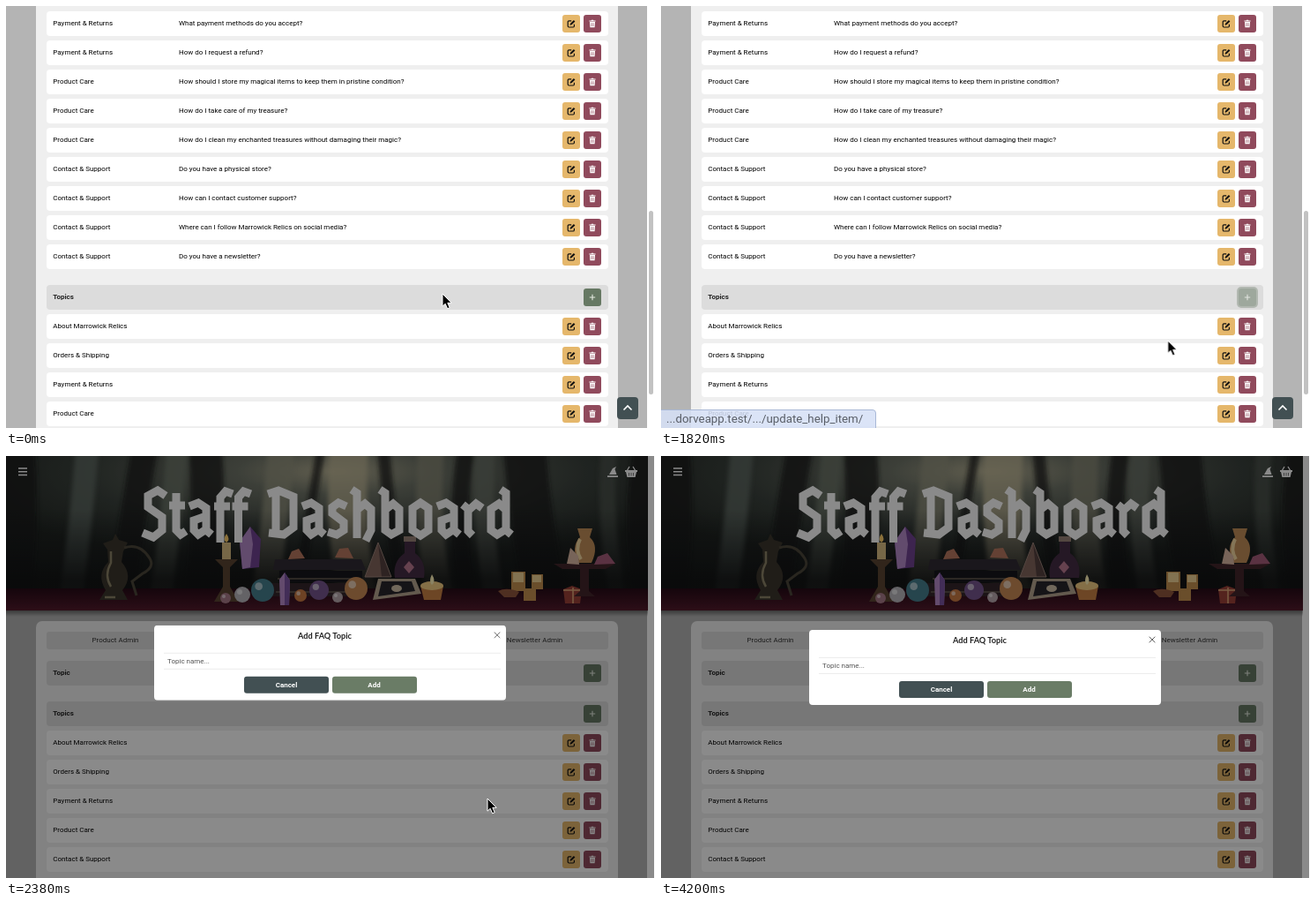
Recreate the animation shown at these times as an HTML page. Size 736 by 478 pixels, loop 4410 ms.

```html
<!DOCTYPE html>
<html lang="en">
<head>
<meta charset="utf-8">
<title>Staff Dashboard</title>
<style>
  html, body { margin: 0; width: 100%; height: 100%; overflow: hidden; background: #fff; }
  #stage { position: relative; width: 736px; height: 478px; overflow: hidden; background: #fff;
    font: 8px/28px Roboto, Arial, sans-serif; color: #000; --loop: 4410ms; }
  #stage * { box-sizing: border-box; }
  .page, .panel, .bar, .btn, .tab, .modal *, .modal, .veil, .status, .thumb, .up, svg { position: absolute; }
  .page { inset: 0; background: linear-gradient(90deg, #b4b4b4 727px, #fff 727px); }
  .panel { left: 34px; width: 660px; background: #efefef; }
  .bar { left: 46px; width: 637px; height: 28px; border-radius: 4px; background: #fff; }
  .bar.head { background: #dcdcdc; font-weight: 700; color: #222; }
  .bar span { position: absolute; left: 7.3px; white-space: nowrap; }
  .bar span + span { left: var(--col, 150px); }
  .btn { top: 4px; width: 20px; height: 20px; border-radius: 3px; }
  .btn svg { left: 5px; top: 4.5px; width: 10px; height: 10px; }
  .edit { left: 585px; background: #e5b76b; }
  .bin { left: 609px; background: #904a5c; color: #fff; }
  .add { left: 609px; background: #667863; color: #fff; }
  .tab { top: 199px; height: 20px; line-height: 20px; border-radius: 3px; background: #dcdcdc; color: #333; text-align: center; }
  .tab.on { background: #525452; color: #fff; font-weight: 700; }
  .thumb { left: 729px; top: 232px; width: 5px; height: 208px; border-radius: 3px; background: #c2c2c2; }
  .up { left: 693px; top: 443px; width: 24px; height: 25px; border-radius: 4px; background: #425053; }
  .status { left: -1px; top: 457px; width: 245px; height: 22px; padding-left: 6px; line-height: 20px; font-size: 13.3px;
    color: #5a5f68; background: rgba(214, 225, 246, .88); border: 1px solid #a9b8d6; border-radius: 0 4px 0 0; white-space: nowrap; }
  .veil { left: 0; top: 0; width: 735px; height: 478px; background: #000; }
  .modal { left: 168px; top: 196.5px; width: 399px; height: 85.5px; border-radius: 4px; background: #fff; }
  .modal h1 { margin: 0; left: 0; width: 387px; top: 2.5px; text-align: center;
    font: 700 9.2px/20px Lato, "Open Sans", sans-serif; color: #222; }
  .field { left: 11px; top: 31.5px; width: 382px; height: 19px; padding-left: 4px; line-height: 17px; color: #555;
    border: solid #ececec; border-width: 1px 0; }
  .act { top: 58.5px; width: 96px; height: 19px; line-height: 19px; border-radius: 3px; text-align: center; font-weight: 700; color: #fff; }

  #list { animation: leave var(--loop) step-end infinite; }
  .late { animation: late var(--loop) step-end infinite; }
  .hover { animation: hover var(--loop) linear infinite; }
  .status { animation: status var(--loop) linear infinite; }
  .veil { animation: veil var(--loop) linear infinite; }
  .modal { animation: fade var(--loop) linear infinite, drop var(--loop) linear infinite; }
  #cursor { left: 0; top: 0; animation: point var(--loop) ease-in-out infinite; }

  @keyframes leave { 0% { visibility: visible } 42.8%, 100% { visibility: hidden } }
  @keyframes late { 0% { visibility: hidden } 47.6%, 100% { visibility: visible } }
  @keyframes hover {
    0%, 16% { opacity: 1; box-shadow: 0 0 0 0 #66786300 }
    19.4%, 30.1% { opacity: .52; box-shadow: 0 0 0 0 #66786300 }
    31.7%, 100% { opacity: .52; box-shadow: 0 0 0 2px #667863b0 }
  }
  @keyframes status { 0%, 18% { opacity: 0 } 21%, 100% { opacity: 1 } }
  @keyframes veil { 0%, 49% { opacity: 0 } 52.4%, 100% { opacity: .46 } }
  @keyframes fade { 0%, 49% { opacity: 0 } 52.4%, 100% { opacity: 1 } }
  @keyframes drop {
    0% { transform: translateY(-50px) }
    49% { transform: translateY(-50px); animation-timing-function: ease-out }
    55.8%, 100% { transform: none }
  }
  @keyframes point {
    0% { transform: translate(495px, 326px); animation-timing-function: cubic-bezier(.45, 0, .72, .8) }
    14.3% { transform: translate(645px, 330px); animation-timing-function: ease-out }
    20%, 33.5% { transform: translate(664.5px, 328px) }
    45.4%, 46% { transform: translate(545px, 396px) }
    54%, 65.1% { transform: translate(546px, 388px) }
    73%, 100% { transform: translate(546px, 482px) }
  }
</style>
</head>
<body>
<div id="stage">
  <svg width="0" height="0">
    <symbol id="edit" viewBox="0 0 10 10">
      <path d="M5.2 1.8H2.4A1.2 1.2 0 0 0 1.2 3V7.8A1.2 1.2 0 0 0 2.4 9H7.2A1.2 1.2 0 0 0 8.4 7.8V5.8" fill="none" stroke="#111" stroke-width="1.2"/>
      <path d="M3.5 6.7L3.9 4.9 7.9 .9 9.4 2.4 5.4 6.3Z" fill="#111"/>
    </symbol>
    <symbol id="bin" viewBox="0 0 10 10">
      <path d="M1.4 1.5H3.6L4 .8H6L6.4 1.5H8.6V2.5H1.4ZM2 3H8L7.6 9.2H2.4Z" fill="currentColor"/>
      <path d="M3.8 4.2V8M5 4.2V8M6.2 4.2V8" stroke="#904a5c" stroke-width=".5"/>
    </symbol>
    <symbol id="add" viewBox="0 0 10 10"><path d="M5 1.8V8.2M1.8 5H8.2" stroke="#e6ebe2" stroke-width="1.1"/></symbol>
  </svg>

  <div class="page" id="dash">
    <svg width="728" height="190" viewBox="0 0 728 190" id="banner">
      <defs>
        <radialGradient id="glow" cx="51%" cy="10%" r="60%">
          <stop offset="0" stop-color="#b3ae92"/><stop offset=".25" stop-color="#6f7468"/>
          <stop offset=".65" stop-color="#3b423d"/><stop offset="1" stop-color="#232824"/>
        </radialGradient>
        <linearGradient id="dusk" x2="0" y2="1">
          <stop offset=".35" stop-color="#14171a" stop-opacity="0"/><stop offset=".8" stop-color="#111213" stop-opacity=".85"/>
        </linearGradient>
        <linearGradient id="table" x2="0" y2="1"><stop offset="0" stop-color="#260a16"/><stop offset="1" stop-color="#521a2b"/></linearGradient>
        <linearGradient id="shade" x2="0" y2="1"><stop offset="0" stop-opacity=".4"/><stop offset="1" stop-opacity="0"/></linearGradient>
        <filter id="soft" filterUnits="userSpaceOnUse" x="-20" y="-20" width="768" height="215"><feGaussianBlur stdDeviation="2.5"/></filter>
      </defs>
      <path d="M0 175H728V182H0Z" fill="url(#shade)"/>
      <path d="M0 0H728V175H0Z" fill="url(#glow)"/>
      <svg width="728" height="175"><g filter="url(#soft)" id="trees" fill="none"></g></svg>
      <path d="M0 0H728V175H0Z" fill="url(#dusk)"/>
      <path d="M0 150H728V175H0Z" fill="url(#table)"/>
      <!-- pitcher -->
      <path d="M110 99L121 95 124 88 128 95 138 98 133 108 131 120Q145 136 132 152L138 163H106L113 152Q102 134 116 120L115 106Z" fill="#3b362c"/>
      <path d="M134 104Q152 98 163 116 169 126 155 133L143 142 148 158" fill="none" stroke="#4b463a" stroke-width="3"/>
      <path d="M119 108V121Q111 135 119 148M112 160H124" fill="none" stroke="#8c8267" stroke-width="2.5"/>
      <!-- candlestick and amethyst -->
      <path d="M245 98H255V118H245Z" fill="#d9bd83"/>
      <path d="M250 88Q255 95 250 98Q245 95 250 88" fill="#ffcf6b"/>
      <path d="M237 117H263L254 126V148L264 165H236L246 148V126Z" fill="#5b4531"/>
      <path d="M265 97L277 80 289 94 287 126 268 128Z" fill="#704292"/>
      <path d="M277 80L280 100 277 126 268 128 265 97Z" fill="#b48ac8"/>
      <!-- books -->
      <path d="M305 117H403L408 129H303Z" fill="#302b33"/>
      <path d="M310 130H404V143H310Z" fill="#16161c"/>
      <path d="M301 144H402V159H301Z" fill="#33242b"/>
      <path d="M308 139H401M306 154H398" stroke="#665b50" stroke-width="1.5"/>
      <path d="M320 117L324 108 332 105 339 116ZM373 115L378 105 388 104 394 116Z" fill="#b9785f"/>
      <!-- loose gems -->
      <g id="gems"></g>
      <path d="M310 140L316 132 322 141 321 169H311Z" fill="#b78bc8"/>
      <path d="M316 132L322 141 321 169H316Z" fill="#7953a1"/>
      <!-- pyramid, bottle and card -->
      <path d="M422 98L437 137H407Z" fill="#54413f"/><path d="M422 98L426 137H407Z" fill="#a17d70" opacity=".6"/>
      <path d="M422 98L437 137H407Z" fill="none" stroke="#9a8278"/>
      <path d="M452 95H464V110Q477 120 474 138H441Q438 120 452 110Z" fill="#452c44"/>
      <path d="M451 91H465V97H451Z" fill="#998278"/><path d="M457 119L463 126 457 133 451 126Z" fill="#bb7992"/>
      <path d="M422 139H464L471 156 416 163Z" fill="#b7a590"/><path d="M426 142H460L464 153 422 159Z" fill="#27242b"/>
      <ellipse cx="443" cy="150" rx="6" ry="4" fill="#d0c0a8"/>
      <path d="M470 147H496L493 163H474Z" fill="#c98145"/><ellipse cx="483" cy="147" rx="13" ry="5" fill="#f4cc83"/>
      <path d="M483 134Q488 142 483 146Q479 142 483 134" fill="#fff2b8"/>
      <!-- right-hand group -->
      <path d="M573 131H589V153H573ZM596 134H609V151H596ZM587 150H601V164H587Z" fill="#c48f50"/>
      <path d="M575 132H587V143H575ZM597 135H607V143H597Z" fill="#f0d296"/>
      <path d="M558 153Q568 148 582 154L578 160H565Z" fill="#90563c"/>
      <path d="M632 151L642 147 653 151 651 167H634Z" fill="#9a4038"/><path d="M632 152H653M643 149V167" stroke="#e0aa79" stroke-width="1.5"/>
      <path d="M621 122H691L680 128H661V153L668 159H644L651 153V128H631Z" fill="#42242a"/>
      <path d="M648 82H665L662 92Q673 102 664 121H649Q640 103 651 92Z" fill="#c28e58"/>
      <path d="M651 94Q645 106 652 117" fill="none" stroke="#f4d7a1" stroke-width="4"/>
      <path d="M636 122L640 104 649 113 650 123Z" fill="#dcb9a4"/>
      <path d="M667 123L671 114 682 110 691 122Z" fill="#a55d7a"/>
      <g id="title" role="img" aria-label="Staff Dashboard" fill="none" stroke="#fff" stroke-width="9" stroke-miterlimit="3"></g>
      <g class="late" fill="none" stroke="#fff">
        <path d="M14 14H24M14 17.7H24M14 21.4H24" stroke-width="1.5"/>
        <path d="M682 22.3H694V24H682ZM684 21L688 14 692 12 690.5 15 692.5 21Z" fill="#fff" stroke="none"/>
        <path d="M704 17L707 12M714 17L711 12" stroke-width="1.3"/>
        <path d="M702 16H716V18H715L713.6 24H704.4L703 18H702Z" fill="#fff" stroke="none"/>
        <path d="M706.5 19V22.5M709 19V22.5M711.5 19V22.5" stroke="#555" stroke-width=".8"/>
      </g>
    </svg>
    <div class="panel" style="top:187px;height:300px;border-radius:7px"></div>
  </div>

  <div class="page" id="list">
    <div class="panel" style="top:0;height:478px"></div>
    <div class="thumb"></div>
    <div class="up"><svg width="24" height="25"><path d="M7.5 14.5L12 10 16.5 14.5" fill="none" stroke="#fff" stroke-width="1.6"/></svg></div>
  </div>

  <div class="veil"></div>
  <div class="modal">
    <h1>Add FAQ Topic</h1>
    <svg style="left:385px;top:7.5px" width="8" height="8"><path d="M.7 .7L7.3 7.3M7.3 .7L.7 7.3" stroke="#666"/></svg>
    <div class="field">Topic name...</div>
    <div class="act" style="left:102px;background:#425053">Cancel</div>
    <div class="act" style="left:201.5px;background:#6a7c66">Add</div>
  </div>
  <svg id="cursor" width="14" height="20" overflow="visible">
    <path d="M0 0V14.2L3.2 11.3 5.6 16.8 8.2 15.7 5.8 10.3H10.2Z" fill="#000" stroke="#fff"/>
  </svg>
</div>
<script>
  const $ = id => document.getElementById(id);
  const put = (el, html) => el.insertAdjacentHTML('beforeend', html);
  const list = $('list'), dash = $('dash');

  const button = (kind, late, extra = '') =>
    `<div class="btn ${kind} ${extra}"><svg class="${late ? 'late' : ''}"><use href="#${kind}"/></svg></div>`;
  const bar = (page, mid, texts, head, extra) => {
    const late = page === dash;
    const kinds = head ? ['add'] : ['edit', 'bin'];
    put(page, `<div class="bar ${head ? 'head' : ''}" style="top:${mid - 14}px;--col:${head ? 197 : 150}px">` +
      texts.map(t => `<span>${t}</span>`).join('') +
      kinds.map(k => button(k, late, extra)).join('') + '</div>');
  };

  const shop = 'Marrowick Relics';
  const topics = ['About ' + shop, 'Orders &amp; Shipping', 'Payment &amp; Returns', 'Product Care', 'Contact &amp; Support'];
  const questions = [
    [2, 'What payment methods do you accept?'],
    [2, 'How do I request a refund?'],
    [3, 'How should I store my magical items to keep them in pristine condition?'],
    [3, 'How do I take care of my treasure?'],
    [3, 'How do I clean my enchanted treasures without damaging their magic?'],
    [4, 'Do you have a physical store?'],
    [4, 'How can I contact customer support?'],
    [4, `Where can I follow ${shop} on social media?`],
    [4, 'Do you have a newsletter?']
  ];
  questions.forEach(([topic, q], i) => bar(list, 20 + 33 * i, [topics[topic], q]));
  bar(list, 330, ['Topics'], true, 'hover');
  topics.forEach((t, i) => {
    bar(list, 363 + 33 * i, [t]);
    bar(dash, 325 + 33 * i, [t]);
  });
  put(list, '<div class="status">...dorveapp.test/.../update_help_item/</div>');
  bar(dash, 246, ['Topic', 'Question'], true);
  bar(dash, 292, ['Topics'], true);
  [['Product', 46, 156], ['FAQ', 205.5, 142.5], ['Message', 351, 161], ['Newsletter', 516, 167]].forEach(([name, x, w]) =>
    put(dash, `<div class="tab ${name === 'FAQ' ? 'on' : ''}" style="left:${x}px;width:${w}px">${name} Admin</div>`));

  // Broad-nib lettering: strokes and advance per letter
  const glyphs = {
    S: ['M27 11L18 5 7 11V24L23 35V50L13 58 1 53', 30],
    t: ['M9 8V50L14 55 20 51M1 22H19', 21],
    a: ['M3 23L13 19 22 25V50L28 55M22 34L8 39V50L13 55 22 49', 30],
    f: ['M8 64V13L14 6 22 9M1 23H19', 20.5],
    D: ['M1 9L13 5 30 12V47L19 55 2 53M10 8V54', 37],
    s: ['M23 23L14 19 7 24V31L20 41V50L12 55 2 52', 27],
    h: ['M2 4L8 8V59M8 27L17 20 24 26V50L18 62', 32],
    b: ['M2 4L8 8V50L15 55 24 50V26L17 20 8 27', 32],
    o: ['M7 25L16 19 25 25V50L16 56 7 50Z', 32],
    r: ['M2 21L8 26V51L13 56M8 28L17 20 24 25', 27],
    d: ['M18 4L24 8V50L30 55M24 27L16 20 7 26V50L14 55 24 49', 33]
  };
  let pen = 154;
  for (const c of 'Staff Dashboard') {
    const [d, advance] = glyphs[c] || ['', 20];
    if (d) put($('title'), `<path transform="translate(${pen} 34)" d="${d}"/>`);
    pen += advance;
  }

  // Pale gaps first, then trunks leaning away from the light
  const trunk = (x, w, color, lean) =>
    put($('trees'), `<path d="M${x + lean} -8Q${x - 3} 80 ${x + (x < 364 ? -16 : 16)} 172" stroke="${color}" stroke-width="${w}" opacity=".75"/>`);
  [[88, 26, '#66716a'], [190, 24, '#717a6e'], [308, 30, '#959580'], [385, 44, '#c0b898'], [478, 30, '#8b8b79'], [540, 22, '#6d7469'], [680, 18, '#505650']]
    .forEach(([x, w, c]) => trunk(x, w, c, 4));
  [[20, 46], [145, 30], [236, 38], [345, 10], [438, 14], [510, 20], [598, 48], [716, 34]]
    .forEach(([x, w], i) => trunk(x, w, '#1a1e1b', i % 2 ? 12 : -10));

  [[268, 157, 9, '#b9b6bb'], [291, 152, 13, '#467f8e'], [334, 158, 7, '#c97943'], [355, 152, 11, '#75558d'],
   [397, 150, 13, '#c98a54'], [249, 161, 6, '#a87988'], [376, 160, 6, '#b8a8ad']].forEach(([x, y, r, c]) =>
    put($('gems'), `<circle cx="${x}" cy="${y}" r="${r}" fill="${c}"/><circle cx="${x - r / 3}" cy="${y - r / 3}" r="${r / 3}" fill="#fff" opacity=".55"/>`));
</script>
</body>
</html>
```
